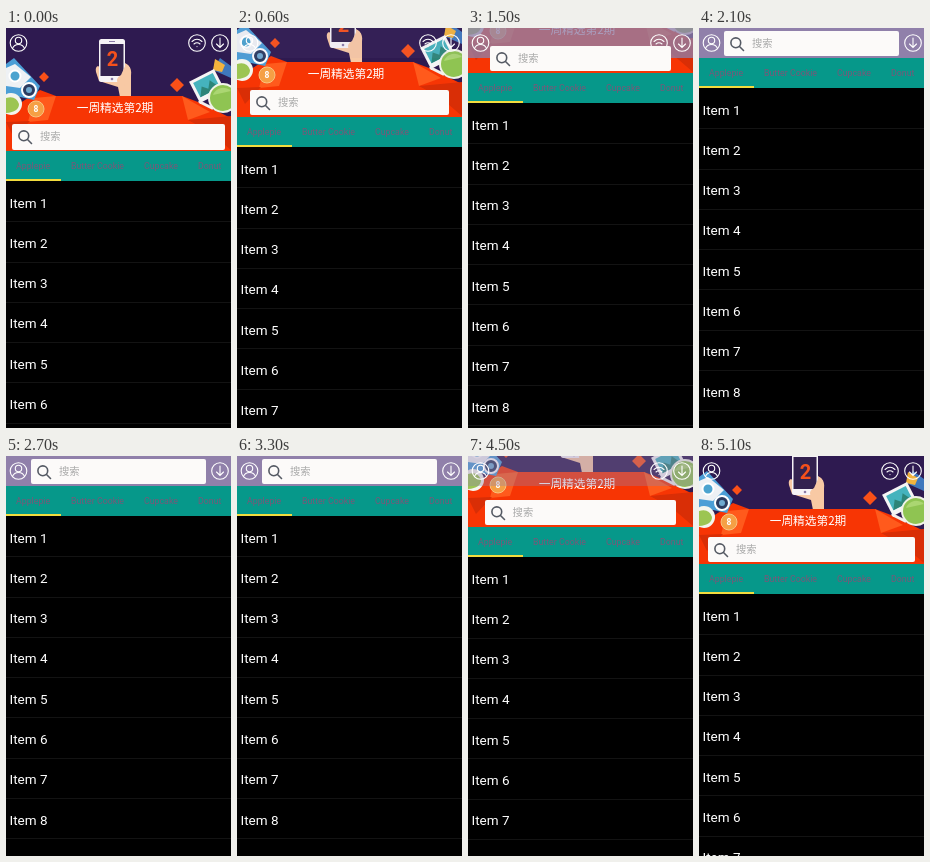
Write an HTML page that moves like this. It is 225x400 px and loops after 5400 ms.

```html
<!DOCTYPE html>
<html lang="zh">
<head>
<meta charset="utf-8">
<title>Collapsing header</title>
<style>
@property --y { syntax: "<number>"; inherits: true; initial-value: 0; }
html, body { margin: 0; width: 100%; height: 100%; overflow: hidden; background: #000; }
.stage {
  position: relative; width: 225px; height: 400px; overflow: hidden;
  background: #000; color: #fff; font-family: Roboto, sans-serif;
  animation: pull 5.4s step-end infinite;
}
.stage > * { position: absolute; }

/* the list is pushed up, rests, then comes back in 300 ms steps */
@keyframes pull {
  0% { --y: 0; }
  5.5556%, 94.4444% { --y: 15; }
  11.1111%, 88.8889% { --y: 34; }
  16.6667%, 83.3333% { --y: 52; }
  22.2222%, 77.7778% { --y: 66; }
  27.7778%, 72.2222% { --y: 78; }
  33.3333%, 66.6667% { --y: 87; }
  38.8889%, 61.1111% { --y: 93; }
  100% { --y: 0; }
}

.art, .sheet { left: 0; top: 0; transform: translateY(calc(var(--y) * -1px)); }
.art { width: 225px; height: 124px; overflow: hidden; }
.title { font: 500 11.7px "Noto Sans CJK SC", "Noto Sans CJK", sans-serif; }
.bar {
  left: 0; top: 0; width: 225px; height: 30px; background: #9080aa;
  opacity: clamp(0, calc((var(--y) - 30) / 62), 1);
}
.icons { left: 0; top: 0; fill: none; stroke: #fff; stroke-width: 1.1; stroke-linecap: round; }

.search {
  left: calc(6px + var(--y) * .204px);
  top: calc(95.5px - var(--y) * .995px);
  width: calc(212.5px - var(--y) * .4px);
  height: calc(26px - var(--y) * .008px);
  border-radius: 2px; background: #fcfaf9;
  display: flex; align-items: center;
}
.search svg { margin-left: 5px; fill: none; stroke: #555a64; stroke-width: 1.6; stroke-linecap: round; }
.search span { margin-left: 7px; color: #aaa; font: 10.3px/1 "Noto Sans CJK SC", "Noto Sans CJK", sans-serif; }

.sheet { top: 123px; width: 225px; }
.tabs { position: relative; height: 30px; background: #06988a; font-size: 8.8px; line-height: 31px; color: #795878; }
.tabs span { position: absolute; top: 0; white-space: nowrap; }
.tabs i { position: absolute; left: 0; bottom: 0; width: 55px; height: 2px; background: #f2dc3e; }
#list { margin-top: 1px; }
.row {
  height: 40.3px; padding: .5px 0 0 3.5px; box-sizing: border-box;
  border-bottom: 1px solid #131313; font-size: 13.5px; line-height: 40.3px;
}
</style>
</head>
<body>
<div class="stage">
  <svg class="art" viewBox="0 0 225 124">
    <path fill="#2e1a50" d="M0 0H225V124H0Z"/>

    <!-- hand and phone -->
    <path fill="#f8c9a4" d="M92 38Q89 39 90 44L93 53L112 59L114 69H125V46Q125 38 119 35L112 52Z"/>
    <rect x="93" y="11" width="26" height="43" rx="2.5" fill="#f6f3f6"/>
    <rect x="94.5" y="16" width="23" height="32" fill="#33224f"/>
    <circle cx="106" cy="51" r="1.3" fill="#8b7ba6"/>
    <path stroke="#8b7ba6" d="M103 13.5H109"/>
    <path fill="#f8c9a4" d="M120 36Q126 38 125 48V58L112 56Q109 50 115 47Z"/>
    <text x="106.5" y="38" text-anchor="middle" font-size="20" font-weight="700" fill="#f5511c">2</text>

    <!-- ribbon -->
    <path fill="#f73504" d="M0 84L22 70L34 62L50 68H176L192 74L225 90V124H0Z"/>
    <path fill="#ff5a1c" d="M28 70L50 68L42 92L22 94ZM176 68L204 84L182 92Z"/>
    <path fill="#d92e06" d="M0 94L24 93L8 110ZM182 92L225 88V122L204 104Z"/>
    <path fill="#fa5018" d="M38 44L43 49L38 54L33 49ZM171 50L178 57L171 64L164 57Z"/>

    <!-- left cluster -->
    <path fill="#4b9ed6" d="M0 36L8 30L34 58L28 72L0 66Z"/>
    <path fill="#eef1f4" d="M0 40L9 36L25 49L14 60L0 58Z"/>
    <circle cx="9" cy="48" r="5.5" fill="#4ba3cf" stroke="#fff" stroke-width="2"/>
    <circle cx="23" cy="62" r="7" fill="#2c3c60" stroke="#fff" stroke-width="2"/>
    <circle cx="23" cy="62" r="3" fill="#6fa9cf"/>
    <circle cx="5" cy="76" r="11" fill="#f4f5ee"/>
    <path fill="#9cc552" d="M0 70Q10 67 13 76Q13 84 0 85Z"/>
    <circle cx="30" cy="81" r="8" fill="#f5a045" stroke="#f9c27f"/>
    <text x="30" y="84" text-anchor="middle" font-size="8.5" font-weight="700" fill="#fff">8</text>

    <!-- right cluster -->
    <path fill="#3f78bd" d="M207 42L214 30L225 38V50Z"/>
    <path fill="#f3b33d" d="M207 42L209 31L219 37L216 44Z"/>
    <g transform="translate(201 58) rotate(-27)">
      <rect x="-14" y="-12" width="28" height="24" fill="#f6f5f5"/>
      <rect x="-11" y="-9" width="22" height="16" fill="#45b3bd"/>
      <path fill="#2d8578" d="M-11 7L-5 -2L0 3L5 -4L11 7Z"/>
    </g>
    <path fill="none" stroke="#f4efee" stroke-width="3" stroke-linecap="round" d="M194 74L206 80"/>
    <circle cx="217" cy="70" r="14" fill="#8fc452" stroke="#f1f3e8" stroke-width="2"/>
    <path fill="#abd672" d="M207 67A11 11 0 0 1 225 63Z"/>

    <text class="title" x="109" y="84.3" text-anchor="middle" fill="#fff">一周精选第2期</text>
  </svg>

  <div class="bar"></div>

  <svg class="icons" width="225" height="30">
    <circle cx="12.5" cy="15" r="8.3"/>
    <circle cx="12.5" cy="12.5" r="3.2"/>
    <path d="M6.5 20.5Q8 16.5 12.5 16.5T18.5 20.5"/>
    <circle cx="191" cy="15" r="8.3"/>
    <path d="M186 13.5Q191 9 196 13.5M188 16Q191 13.5 194 16M191 18.5V18.6"/>
    <circle cx="214" cy="15" r="8.3"/>
    <path d="M214 10V19.5M210.5 16L214 19.5L217.5 16"/>
  </svg>

  <div class="sheet">
    <div class="tabs">
      <span style="left:10px">Applepie</span>
      <span style="left:65px">Butter Cookie</span>
      <span style="left:138px">Cupcake</span>
      <span style="left:192px">Donut</span>
      <i></i>
    </div>
    <div id="list"></div>
  </div>

  <div class="search">
    <svg width="16" height="16"><circle cx="6.8" cy="6.8" r="4.9"/><path d="M10.5 10.5L14.5 14.5"/></svg>
    <span>搜索</span>
  </div>
</div>
<script>
const list = document.getElementById("list");
for (let n = 1; n <= 10; n++) {
  const row = document.createElement("div");
  row.className = "row";
  row.textContent = "Item " + n;
  list.append(row);
}
</script>
</body>
</html>
```
